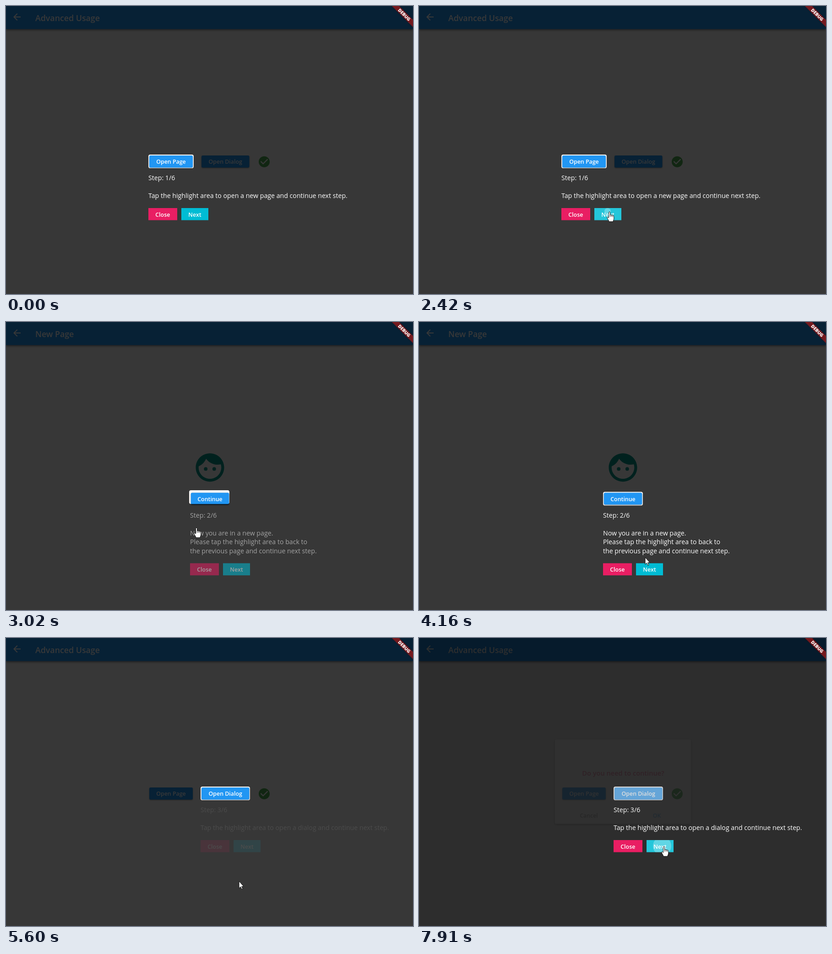
Animation, 889 px wide and 630 px high, one loop 7.99 s. Source, as an HTML page:

```html
<!DOCTYPE html>
<html lang="en">
<head>
<meta charset="utf-8">
<title>Guided tour</title>
<style>
html, body { margin: 0; width: 100%; height: 100%; overflow: hidden; background: #373737; }
svg { display: block; width: 100%; height: 100%; font-family: "Open Sans", "Noto Sans", sans-serif; }
.title { font-size: 17.8px; font-weight: 600; fill: #fff; }
.label { font-size: 12.4px; font-weight: 600; text-anchor: middle; }
.tip { font-size: 14.18px; fill: #fff; }
.bar { filter: drop-shadow(0 2px 2px #0007); }
.raised { filter: drop-shadow(0 1.5px 1px #0006); }
</style>
</head>
<body>
<svg id="stage" viewBox="0 0 889 630"></svg>
<script>
const LOOP = 7990, LAST = 7910;
const PUSH = 2450, POP = 5143, DIALOG = 7860, ROUTE = 300;
const LEAVE_1 = 2545, LEAVE_2 = 5143;
const BLUE = '#2196f3';

const HOLES = [[311, 325, 99, 30], [402, 371.5, 87, 30], [425, 325, 108, 30]];
const NEAR_2 = [400, 368, 88, 30];
const TIPS = [
  ['Tap the highlight area to open a new page and continue next step.'],
  ['Now you are in a new page.', 'Please tap the highlight area to back to',
   'the previous page and continue next step.'],
  ['Tap the highlight area to open a dialog and continue next step.']
];
const LINE = 19.6;

// time, x, y of the pointer tip
const POINTER = [
  [400, 754, 605], [610, 487, 554], [770, 487, 554], [1070, 434, 486],
  [1340, 415, 447], [1560, 415, 447], [1610, 416, 450], [3530, 416, 450],
  [3840, 486, 487], [3990, 486, 487], [4370, 503, 548], [4560, 503, 548],
  [4660, 507, 541], [5550, 507, 541], [5800, 515, 495], [6100, 522, 468],
  [6510, 532, 456], [7270, 532, 456], [7310, 535, 456]
];
const CLICKS = [2400, 5030, 7760];

const ICON = {
  back: 'M20 11H7.83l5.59-5.59L12 4l-8 8 8 8 1.41-1.41L7.83 13H20v-2z',
  check: 'M12 2C6.48 2 2 6.48 2 12s4.48 10 10 10 10-4.48 10-10S17.52 2 12 2zm-2 15l-5-5 1.41-1.41L10 14.17l7.59-7.59L19 8l-9 9z',
  face: 'M9 11.75a1.25 1.25 0 1 0 0 2.5 1.25 1.25 0 0 0 0-2.5zm6 0a1.25 1.25 0 1 0 0 2.5 1.25 1.25 0 0 0 0-2.5zM12 2C6.48 2 2 6.48 2 12s4.48 10 10 10 10-4.48 10-10S17.52 2 12 2zm0 18c-4.41 0-8-3.59-8-8 0-.29.02-.58.05-.86 2.36-1.05 4.23-2.98 5.21-5.37C11.07 8.33 14.05 10 17.42 10c.78 0 1.53-.09 2.25-.26.21.71.33 1.47.33 2.26 0 4.41-3.59 8-8 8z'
};

const rect = (x, y, w, h, fill, more = '') =>
  `<rect x="${x}" y="${y}" width="${w}" height="${h}" fill="${fill}" ${more}/>`;
const text = (x, y, cls, str, fill = '#fff') =>
  `<text x="${x}" y="${y}" class="${cls}" fill="${fill}">${str}</text>`;
const icon = (name, cx, cy, scale, fill) =>
  `<path d="${ICON[name]}" fill="${fill}" transform="translate(${cx} ${cy}) scale(${scale}) translate(-12 -12)"/>`;
const button = (x, y, w, h, str) =>
  rect(x, y, w, h, BLUE, 'rx="3" class="raised"') +
  text(x + w / 2, y + h / 2 + 5, 'label', str);

const page = (id, title, body) => `<g id="${id}">
  ${rect(0, 0, 889, 630, '#fafafa')}
  ${rect(0, 0, 889, 50.5, BLUE, 'class="bar"')}
  ${icon('back', 24, 24, 1, '#fff')}
  ${text(64, 32.7, 'title', title)}${body}</g>`;

const tip = (lines, i) => {
  const [x, y, , h] = HOLES[i], top = 87 + LINE * (lines.length - 1);
  return `<g id="tip${i}" transform="translate(${x} ${y + h})">
    ${text(0, 26, 'tip', `Step: ${i + 1}/6`)}
    ${lines.map((s, n) => text(0, 65 + LINE * n, 'tip', s)).join('')}
    <g transform="translate(0 ${top})">
      ${rect(0, 0, 63, 26.5, '#e91e63')}${text(31.3, 18.6, 'label', 'Close')}
      ${rect(72, 0, 59, 26.5, '#00bcd4')}${text(101.5, 18.6, 'label', 'Next')}
      ${rect(72, 0, 59, 26.5, '#fff', `id="glow${i}"`)}
      <g clip-path="url(#next)"><circle id="ripple${i}" fill="#fff" fill-opacity=".28"/></g>
    </g></g>`;
};

document.getElementById('stage').innerHTML = `
  <defs><clipPath id="next">${rect(72, 0, 59, 26.5, '#000')}</clipPath></defs>
  ${rect(0, 0, 889, 630, '#fafafa')}
  ${page('home', 'Advanced Usage',
    button(313, 327, 95, 26.5, 'Open Page') +
    button(427, 327, 104.5, 26.5, 'Open Dialog') +
    icon('check', 564, 340.8, 1.2, '#4caf50'))}
  ${rect(0, 0, 889, 630, '#000', 'id="scrim"')}
  ${page('fresh', 'New Page',
    icon('face', 445.5, 318.3, 3.1, '#009688') +
    button(403.8, 373.5, 83.4, 26, 'Continue'))}
  ${rect(0, 0, 889, 630, '#000', 'id="barrier"')}
  <g id="dialog">
    ${rect(297, 222, 297, 184.5, '#fafafa', 'rx="3" class="bar"')}
    <text x="446" y="300.5" font-size="14.6" font-weight="600" text-anchor="middle" fill="#e91e63">Do you need to continue?</text>
    ${text(371, 392.8, 'label', 'Cancel', '#757575')}
    ${text(519.5, 392.8, 'label', 'OK', BLUE)}
  </g>
  <path id="mask" fill="#000" fill-opacity=".78" fill-rule="evenodd"/>
  ${TIPS.map(tip).join('')}
  <g transform="translate(889 0) rotate(45)">
    ${rect(-50, 21.4, 100, 11.2, '#b71c1c', 'fill-opacity=".63" style="filter:drop-shadow(0 0 2px #0008)"')}
    <text y="30.5" font-size="9.7" font-weight="800" text-anchor="middle" fill="#fff">DEBUG</text>
  </g>
  <g id="pointer" stroke="#000" stroke-width=".9" stroke-linejoin="round" fill="#fff">
    <path id="arrow" d="M.4 .5V15.8L3.8 12.6L6.2 17.9L8.4 16.9L6.1 11.8H10.6Z"/>
    <path id="hand" d="M-1.5 1.7C-1.5 -.1 1.5 -.1 1.5 1.7V7.5C1.5 6.3 4.5 6.3 4.5 7.8C4.7 6.9 7.3 7 7.3 8.5C7.5 7.7 9.8 8 9.8 9.8V15C9.8 18 8 18.5 8 21.7H-1C-1 19 -4.8 15.5 -5 13C-5.2 11.2 -3.2 11 -2.4 12.4L-1.5 13.5ZM1.5 7.5V11M4.5 8V11M7.3 8.7V11.5"/>
  </g>`;

const $ = id => document.getElementById(id);
const set = (id, attrs) => {
  for (const k in attrs) $(id).setAttribute(k, attrs[k]);
};
const show = (id, alpha) =>
  set(id, { opacity: alpha, visibility: alpha > 0 ? 'visible' : 'hidden' });
const clamp = v => Math.max(0, Math.min(1, v));
const span = (t, a, b) => clamp((t - a) / (b - a));
const mix = (a, b, p) => a.map((v, i) => v + (b[i] - v) * p);
const easeOut = p => 1 - (1 - p) ** 3;
const zoom = (id, s) =>
  set(id, { transform: `translate(444.5 315) scale(${s}) translate(-444.5 -315)` });

function drawRoutes(t) {
  const push = span(t, PUSH, PUSH + ROUTE), pop = span(t, POP, POP + ROUTE);
  const popping = t >= POP;
  const inP = easeOut(push), outP = easeOut(pop);
  zoom('home', popping ? 1.1 - 0.1 * outP : 1 + 0.05 * inP);
  zoom('fresh', popping ? 1 - 0.1 * outP : 0.85 + 0.15 * inP);
  show('scrim', popping ? 0 : 0.6 * span(push, 0.2075, 0.4175));
  show('fresh', popping ? 1 - span(pop, 0.075, 0.2) : span(push, 0.125, 0.25));
  const open = span(t, DIALOG, DIALOG + 150);
  show('barrier', 0.54 * open);
  show('dialog', open);
}

function holeAt(t) {
  if (t < 3020) return mix(HOLES[0], NEAR_2, span(t, LEAVE_1, LEAVE_1 + 300));
  if (t < LEAVE_2) return mix(NEAR_2, HOLES[1], span(t, 3020, 3150));
  return mix(HOLES[1], HOLES[2], span(t, LEAVE_2, LEAVE_2 + 300));
}

function drawMask([x, y, w, h]) {
  const r = 4, a = `a${r} ${r} 0 0 1 `;
  set('mask', {
    d: `M0 0H889V630H0ZM${x + r} ${y}h${w - 2 * r}${a}${r} ${r}v${h - 2 * r}` +
       `${a}${-r} ${r}h${2 * r - w}${a}${-r} ${-r}v${2 * r - h}${a}${r} ${-r}z`
  });
}

function pointerAt(t) {
  const i = POINTER.findIndex(k => k[0] > t);
  if (i < 0) return POINTER.at(-1).slice(1);
  if (i === 0) return null;
  const a = POINTER[i - 1], b = POINTER[i];
  return mix(a, b, span(t, a[0], b[0])).slice(1);
}

function drawTips(t, tipPos) {
  const alphas = [
    t < LEAVE_1 ? 1 : 0,
    t < LEAVE_2 ? span(t, 2860, 3160) : 0,
    span(t, 5570, 5870)
  ];
  let over = false;
  alphas.forEach((alpha, i) => {
    show('tip' + i, alpha);
    const [x, y, , h] = HOLES[i];
    const px = tipPos ? tipPos[0] - x : -1;
    const py = tipPos ? tipPos[1] - (y + h + 87 + LINE * (TIPS[i].length - 1)) : -1;
    const hover = alpha > 0 && px >= 72 && px <= 131 && py >= 0 && py <= 26.8;
    const held = t - CLICKS[i];
    const pressed = alpha > 0 && held > 0;
    over = over || hover;
    $('glow' + i).setAttribute('fill-opacity', pressed ? 0.14 : hover ? 0.04 : 0);
    set('ripple' + i, { cx: px - 4, cy: py - 1, r: pressed ? 5 + held * 0.1 : 0 });
  });
  return over;
}

function draw(t) {
  drawRoutes(t);
  drawMask(holeAt(t));
  const pos = pointerAt(t);
  const over = drawTips(t, pos);
  show('pointer', pos ? 1 : 0);
  if (!pos) {
    $('arrow').style.display = $('hand').style.display = 'none';
    return;
  }
  // the hand lingers until the mouse moves again
  const hand = over || (t >= LEAVE_1 && t < 3530);
  set('pointer', { transform: `translate(${pos[0]} ${pos[1]})` });
  $('hand').style.display = hand ? '' : 'none';
  $('arrow').style.display = hand ? 'none' : '';
}

const start = performance.now();
function tick() {
  draw(Math.min((performance.now() - start) % LOOP, LAST));
  requestAnimationFrame(tick);
}
tick();
</script>
</body>
</html>
```
